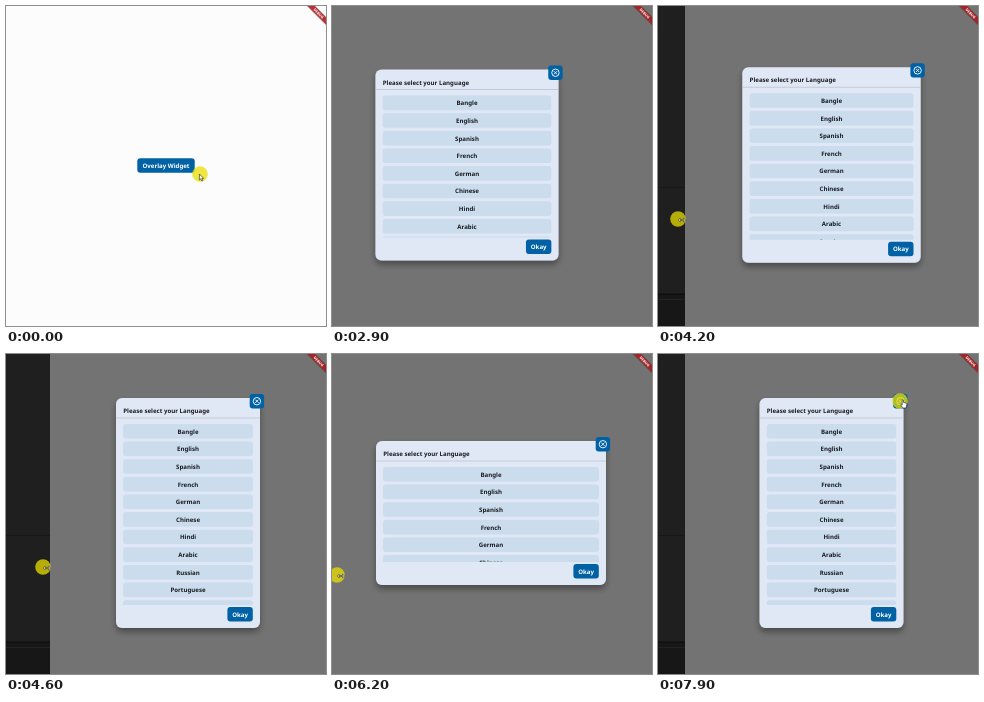
An HTML page for the animation above (8 s loop, 320 by 320 pixels).

```html
<!DOCTYPE html>
<html lang="en">
<head>
<meta charset="utf-8">
<title>Overlay dialog</title>
<style>
  html, body { margin: 0; width: 100%; height: 100%; overflow: hidden; background: #fcfcfc; }
  #stage { display: block; width: 100vw; height: 100vh; }
  text {
    font: 700 6.1px "Noto Sans", "Open Sans", sans-serif;
    text-rendering: geometricPrecision;
    fill: #191c20;
  }
  .mid { text-anchor: middle; }
  .light { fill: #fff; }
  .blue { fill: #0061a4; }
</style>
</head>
<body>
<svg id="stage" viewBox="0 0 320 320">
  <defs>
    <filter id="soft" x="-20%" y="-20%" width="140%" height="140%">
      <feDropShadow dx="0" dy="4" stdDeviation="3.2" flood-color="#000" flood-opacity=".36"/>
    </filter>
  </defs>

  <!-- editor behind the window -->
  <rect width="320" height="320" fill="#1f1f1f"/>
  <rect y="181" width="320" height="1" fill="#171717"/>
  <rect y="287" width="320" height="33" fill="#171717"/>
  <rect y="288" width="320" height="1" fill="#0f0f0f"/>
  <rect y="293" width="320" height="1" fill="#222"/>

  <rect id="page" width="420" height="320" fill="#fcfcfc"/>
  <g id="opener">
    <rect id="openerBox" class="blue" x="131.3" y="152.3" width="57.4" height="14.4" rx="3"/>
    <text class="mid light" x="160" y="161.9">Overlay Widget</text>
  </g>

  <g id="modal">
    <rect id="dim" width="420" height="320" fill="#000" fill-opacity=".54"/>
    <g id="dialog">
      <rect id="panel" rx="6" fill="#e0e8f6" filter="url(#soft)"/>
      <text x="7.3" y="15.2">Please select your Language</text>
      <rect id="rule" y="19.6" height=".8" fill="#bcc4d2"/>
      <svg id="list" x="7" y="22" overflow="hidden"></svg>
      <g id="okay">
        <rect class="blue" width="25.4" height="14.5" rx="3"/>
        <text class="mid light" x="12.7" y="9.5">Okay</text>
      </g>
      <g id="close">
        <rect class="blue" width="14.4" height="14.4" rx="3"/>
        <g fill="none" stroke="#fff" stroke-width=".9">
          <circle cx="7.2" cy="7.2" r="3.7"/>
          <path d="M5.6 5.6l3.2 3.2m0-3.2l-3.2 3.2"/>
        </g>
      </g>
    </g>
  </g>

  <g id="banner" transform="translate(320 0) rotate(45)">
    <rect x="-20" y="7.4" width="40" height="6.4" fill="#000" opacity=".22"/>
    <rect x="-20" y="7.9" width="40" height="5.2" fill="#b01c20" opacity=".86"/>
    <text class="mid light" y="11.8" style="font-size:3.7px">DEBUG</text>
  </g>

  <g id="cursor">
    <circle r="7.8" fill="#ebde00" fill-opacity=".74"/>
    <g id="arrow" fill="#fff" stroke="#222" stroke-width=".6">
      <path d="M-.6 0v6l1.4-1.2 1 2.2 1-.5-1-2.1h1.9z"/>
    </g>
    <g id="hand" fill="#fff" stroke="#222" stroke-width=".6">
      <path d="M2.2-1.2q.8-.6 1.3.2v2.4l2.6.7q.8.3.7 1.1l-.5 2.9q-.2.9-1 .9H3.4q-.7 0-1-.7L.5 3.8q.2-.9 1.7.2z"/>
    </g>
    <g id="resize" fill="#fff" stroke="#222" stroke-width=".6">
      <path d="M.2 1l2-1.7v1.2h3.4v-1.2l2 1.7-2 1.7V1.5H2.2v1.2z"/>
    </g>
  </g>
</svg>

<script>
const $ = id => document.getElementById(id);
const LOOP = 8000, STEP = 100;
const ROW_TOP = 4, ROW_H = 14.6, PITCH = 17.62, MID_Y = 159;
const names = ["Bangle", "English", "Spanish", "French", "German", "Chinese",
  "Hindi", "Arabic", "Russian", "Portuguese", ""];

// [time, value...] tables, read with linear interpolation
const edgeKeys = [[2600, 0], [2700, -12], [2900, -50], [3100, -72], [3300, -79], [3500, -79],
  [3600, -78], [3800, -40], [4000, 4], [4100, 20], [4400, 41], [4600, 44], [4800, 44],
  [5000, 36], [5300, 18], [5600, 2], [5700, -2], [6200, -2], [6300, 8], [6400, 18],
  [6500, 24], [6700, 27]];
const wideKeys = [[2700, 0], [2800, .2], [2900, .455], [3100, 1], [4050, 1], [4300, 0],
  [5600, 0], [5900, 1], [6300, 1], [6600, 0]];
const fadeKeys = [[700, 0], [800, .3], [900, .8], [1000, 1]];
const cursorKeys = [[0, 194, 168], [200, 189, 165], [500, 178, 161], [800, 178, 161],
  [1100, 179.5, 165], [1600, 158, 185], [1800, 80, 199], [2000, 4, 209], [2600, 4, 209],
  [2700, -10, 210], [2900, -57, 211], [3600, -85, 213], [3800, -47, 213], [4000, -3, 213],
  [4100, 13, 213], [4400, 34, 213], [4600, 37, 213], [4800, 37, 213], [5000, 30, 215],
  [5300, 17, 218], [5700, 5, 221], [6200, 5, 221], [6400, 13, 221], [6700, 21, 221],
  [6800, 21, 221], [7000, 130, 130], [7200, 241, 43], [7350, 238, 60], [7600, 200, 245],
  [7700, 171, 259], [7800, 215, 150], [7900, 242, 47]];

function at(keys, t) {
  const next = keys.findIndex(k => k[0] > t);
  if (next === 0) return keys[0].slice(1);
  if (next < 0) return keys[keys.length - 1].slice(1);
  const a = keys[next - 1], b = keys[next];
  const f = (t - a[0]) / (b[0] - a[0]);
  return a.slice(1).map((v, i) => v + (b[i + 1] - v) * f);
}

function set(el, attrs) {
  for (const k in attrs) el.setAttribute(k, attrs[k]);
}

function add(parent, tag, attrs) {
  const el = document.createElementNS("http://www.w3.org/2000/svg", tag);
  set(el, attrs);
  return parent.appendChild(el);
}

const move = (id, x, y) => set($(id), { transform: `translate(${x} ${y})` });
const show = (id, on) => set($(id), { visibility: on ? "visible" : "hidden" });
const inside = (px, py, x, y, w, h) => px >= x && px <= x + w && py >= y && py <= y + h;

const rows = names.map((name, i) => {
  const y = ROW_TOP + i * PITCH;
  const box = add($("list"), "rect", { y, height: ROW_H, rx: 3 });
  const label = add($("list"), "text", { class: "mid", y: y + 9.7 });
  label.textContent = name;
  return { box, label, y };
});

function draw(t) {
  const [edge] = at(edgeKeys, t), [wide] = at(wideKeys, t);
  const [fade] = at(fadeKeys, t), [cx, cy] = at(cursorKeys, t);
  const mid = (edge + 320) / 2;
  const w = 144 + 86 * wide, h = 230 - 86 * wide;
  const x = mid - w / 2, y = MID_Y - h / 2;
  const listW = w - 14, listH = h - 45;
  const px = cx + 3, py = cy + 1;
  const open = fade > 0, sizing = t >= 2000 && t < 6900;

  set($("page"), { x: edge });
  set($("dim"), { x: edge });
  move("opener", mid - 160, 0);
  set($("modal"), { opacity: fade });
  move("dialog", x, y);
  set($("panel"), { width: w, height: h });
  set($("rule"), { width: w });
  set($("list"), { width: listW, height: listH });
  move("okay", w - 32.6, h - 21);
  move("close", w - 10.3, -4);

  const overOpener = !open && inside(px, py, 131, 152, 57, 14);
  set($("openerBox"), { style: overOpener ? "fill:#146cab" : "" });

  const inList = open && !sizing && inside(px, py, x + 7, y + 22, listW, listH);
  let overRow = false;
  for (const r of rows) {
    const hot = inList && inside(px, py, x + 7, y + 22 + r.y, listW, ROW_H);
    overRow = overRow || hot;
    set(r.box, { width: listW, fill: hot ? "#b7cad9" : "#cbdced" });
    set(r.label, { x: listW / 2 });
  }

  const overButton = open && (inside(px, py, x + w - 32.6, y + h - 21, 25.4, 14.5) ||
    inside(px, py, x + w - 10.3, y - 4, 14.4, 14.4));
  const hand = !sizing && (overOpener || overRow || overButton);
  move("cursor", cx, cy);
  show("resize", sizing);
  show("hand", hand);
  show("arrow", !sizing && !hand);
}

const start = performance.now();
function tick() {
  const t = (performance.now() - start) % LOOP;
  draw(Math.floor(t / STEP) * STEP);
  requestAnimationFrame(tick);
}
tick();
</script>
</body>
</html>
```
